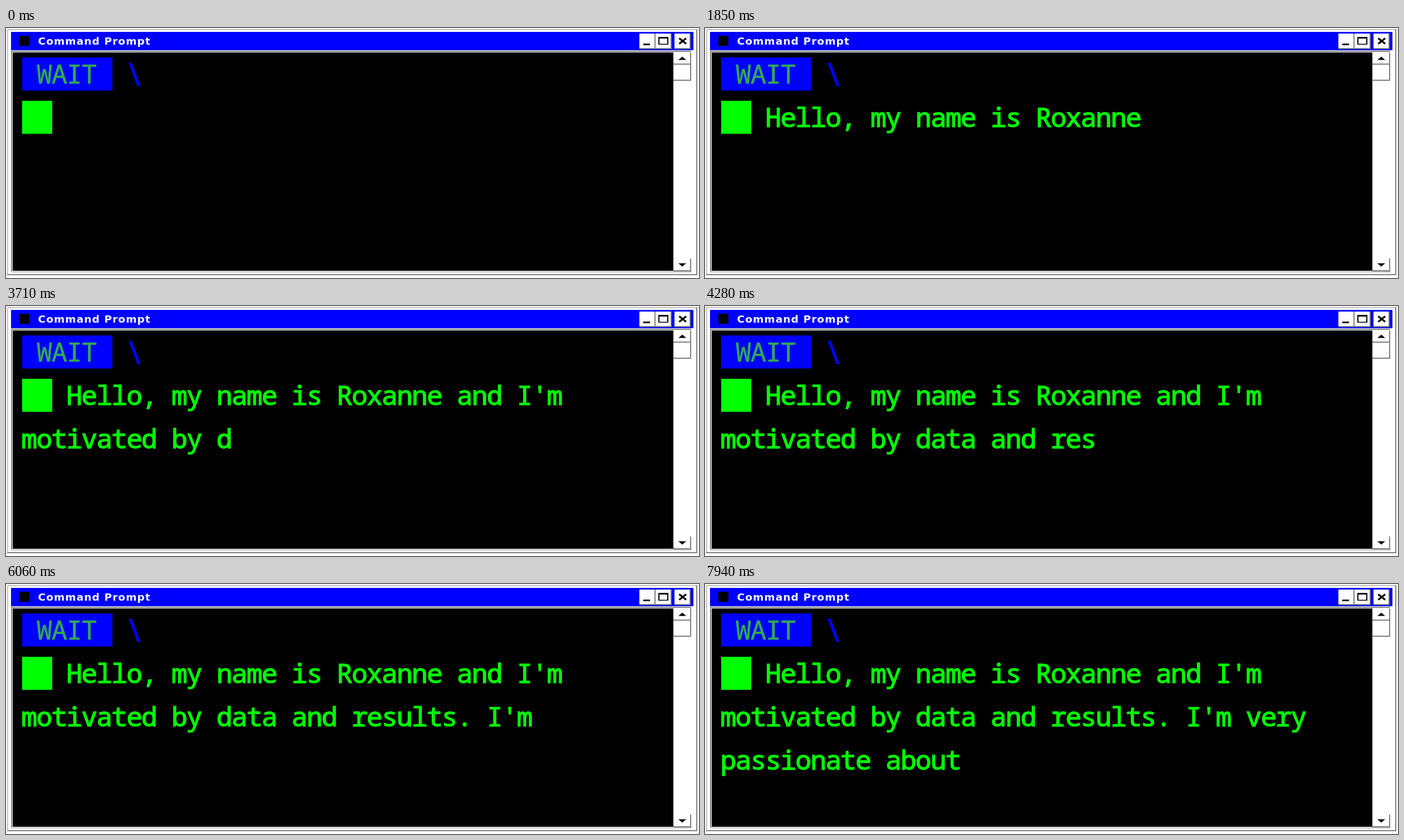
An HTML page for the animation above (8 s loop, 1244 by 450 pixels).

```html
<!DOCTYPE html>
<html lang="en">
<head>
<meta charset="utf-8">
<title>Terminal typing</title>
<style>
  html, body { margin: 0; width: 100%; height: 100%; overflow: hidden; background: #fff; }
  svg { display: block; width: 100%; height: 100%; }
  .mono {
    font: 48px "Noto Sans Mono", "DejaVu Sans Mono", monospace;
    letter-spacing: -1.85px;
    white-space: pre;
  }
  .soft { filter: blur(.6px); }
  .typed { fill: #0f0; stroke: #0f0; stroke-width: 1.4; }
  .wait { fill: #34a853; stroke: #34a853; stroke-width: .6; }
  .spinner { fill: #00f; stroke: #00f; stroke-width: .8; font-size: 56px; }
  .title { font: bold 18.5px "DejaVu Sans", sans-serif; letter-spacing: 1.1px; fill: #fff; }
  .light { fill: none; stroke: #c0c0c0; stroke-width: 2; }
  .dark { fill: none; stroke: #808080; stroke-width: 2; }
</style>
</head>
<body>
<svg viewBox="0 0 1244 450">
  <rect width="1244" height="450" fill="#fff"/>

  <!-- Window frame -->
  <path class="light" d="M3 444V3H1239"/>
  <path class="dark" d="M2 444H1240V2"/>
  <rect x="9" y="7" width="1225" height="33" fill="#00f"/>
  <rect x="24" y="14" width="18" height="18"/>
  <text class="title" x="57.500" y="30">Command Prompt</text>

  <!-- Title buttons -->
  <g id="buttons"></g>
  <path d="M1144 28h12v3h-12z"/>
  <path d="M1171 16h18v14h-18zM1173 19v9.500h14V19z" fill-rule="evenodd"/>
  <path d="M1208.500 18.500L1221 28.500M1221 18.500L1208.500 28.500" stroke="#000" stroke-width="3.400"/>

  <!-- Client area and scrollbar -->
  <path class="dark" d="M10 438V42H1230"/>
  <path class="light" d="M9 439H1231"/>
  <rect x="12" y="44" width="1186" height="393"/>
  <path class="dark" d="M1198 65H1229V44M1198 94H1229V66M1198 437H1229V415"/>
  <path d="M1207 57.500h14l-7-6zM1207 423.500h14l-7 6z"/>

  <!-- Prompt -->
  <g class="soft">
    <rect x="29" y="53" width="162" height="59.500" fill="#00f"/>
    <text class="mono wait" x="54.500" y="100">WAIT</text>
    <text class="mono spinner" x="214" y="104">\</text>
    <rect x="29" y="131" width="54" height="59.500" fill="#0f0"/>
    <g id="lines"></g>
  </g>
</svg>
<script>
const LOOP = 8000, CELL = 26.95, LEFT = 27.5, BASELINE = 177.5, LINE_HEIGHT = 78;

// [start ms, gap ms, chunks typed one after another]; \b erases one character
const bursts = [
  [250, 120, "He|ll|o"],
  [780, 0, ", "],
  [930, 0, "my"],
  [1070, 120, " na|me"],
  [1340, 120, " is| Rox"],
  [1610, 122.5, "an|ne| a|nd| I"],
  [2250, 120, "'|m"],
  [3020, 120, "\nmo|ti|v"],
  [3410, 0, "ate"],
  [3560, 0, "d b"],
  [3710, 120, "y d|ata"],
  [3980, 0, " an"],
  [4130, 0, "d"],
  [4280, 120, " res|ul|ts"],
  [4830, 0, "."],
  [5510, 0, " i"],
  [5790, 0, "\bI"],
  [5930, 130, "'|m"],
  [6460, 120, " ve|r"],
  [6730, 0, "y"],
  [7160, 120, "\npa|ss"],
  [7430, 120, "ion|at"],
  [7700, 120, "e a|bo|ut"]
];
const keystrokes = bursts.flatMap(([start, gap, chunks]) =>
  chunks.split("|").map((text, i) => ({ time: start + i * gap, text })));

function add(parent, tag, attributes) {
  const node = document.createElementNS("http://www.w3.org/2000/svg", tag);
  for (const name in attributes) node.setAttribute(name, attributes[name]);
  return parent.appendChild(node);
}

const buttons = document.getElementById("buttons");
for (const x of [1137, 1166, 1200]) {
  add(buttons, "rect", { x, y: 10, width: 29, height: 28, fill: "#fff" });
  add(buttons, "path", { class: "dark", d: `M${x} 37h28v-27` });
}

const lineGroup = document.getElementById("lines");
const lines = [3, 0, 0].map((column, row) => add(lineGroup, "text", {
  class: "mono typed",
  x: LEFT + column * CELL,
  y: BASELINE + row * LINE_HEIGHT
}));

function render(time) {
  let typed = "";
  for (const key of keystrokes) {
    if (key.time > time) break;
    typed = (typed + key.text).replace(/.[\b]/g, "");
  }
  const rows = typed.split("\n");
  lines.forEach((line, i) => {
    const text = rows[i] || "";
    if (line.textContent !== text) line.textContent = text;
  });
}

const origin = performance.now();
function tick() {
  render((performance.now() - origin) % LOOP);
  requestAnimationFrame(tick);
}
tick();
</script>
</body>
</html>
```
